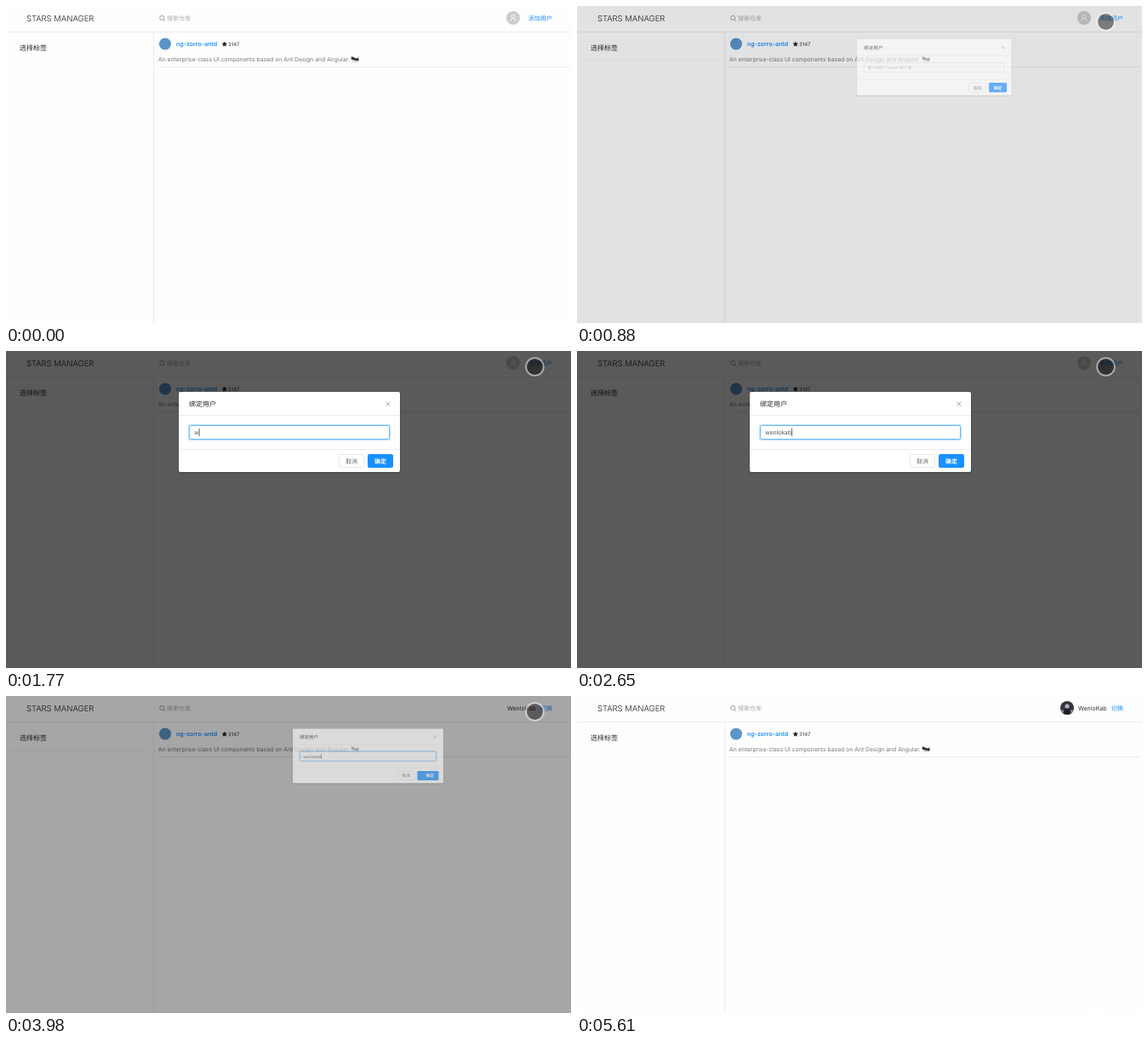
Write an HTML page that moves like this. It is 664x372 px and loops after 5910 ms.

```html
<!DOCTYPE html>
<html lang="zh">
<head>
<meta charset="utf-8">
<title>Stars Manager</title>
<style>
  html, body { margin: 0; height: 100%; overflow: hidden; background: #fefefe; }
  svg { display: block; width: 100vw; height: 100vh; }
  text { font: 7px Inter, "Noto Sans CJK SC", "Noto Sans CJK", sans-serif; text-rendering: geometricPrecision; white-space: pre; }
  .blue { fill: #1890ff; }
  .big { font-size: 8px; fill: #262626; }
  .line { fill: none; stroke: #ececec; }
  .button { fill: #fff; stroke: #d9d9d9; stroke-width: .6; }
</style>
</head>
<body>
<svg viewBox="0 0 664 372">
  <rect width="664" height="372" fill="#fefefe"/>
  <path class="line" d="M0 30.5H664M173.5 31V372M179 71.5H662"/>

  <text x="24" y="18" style="font-size:9.5px;font-weight:300" fill="#222">STARS MANAGER</text>
  <g fill="none" stroke="#777" stroke-width=".7"><circle cx="183.2" cy="13.9" r="2.5"/><path d="M185 15.8l2 2"/></g>
  <text x="189" y="17" fill="#aaa">搜索仓库</text>
  <text class="big" x="16" y="52">选择标签</text>

  <circle cx="187" cy="44.5" r="7" fill="#5b95c9"/>
  <text class="blue" x="200" y="47" font-weight="600" style="font-weight:600">ng-zorro-antd</text>
  <path transform="translate(256.8 44.6)" fill="#222" d="M0-3.2L1-1.1 3.2-.9 1.6.7 2 3 0 1.9-2 3-1.6.7-3.2-.9-1-1.1z"/>
  <text x="261" y="46.8" style="font-size:6px" fill="#333">3147</text>
  <text x="179" y="65" style="font-size:6.8px" fill="#777">An enterprise-class UI components based on Ant Design and Angular.</text>
  <g fill="#2b2523" stroke="#2b2523" stroke-width=".5">
    <ellipse cx="407.6" cy="61.4" rx="1.8" ry="1.5"/><ellipse cx="410.3" cy="62.3" rx="1.5" ry="1.1"/><ellipse cx="413" cy="62.8" rx="1.5" ry="1.4"/>
    <path fill="none" d="M409.5 63l-2 2.6M410.3 63v2.8M411 63l2 2.6M413.5 61.5l1-2M407 60l-1.5-1.3"/>
  </g>

  <g id="guest">
    <circle cx="596" cy="14" r="8" fill="#ccc"/>
    <g fill="none" stroke="#fff" stroke-width=".8"><circle cx="596" cy="12.4" r="2"/><path d="M592.8 18a3.2 3.4 0 0 1 6.4 0"/></g>
    <text class="blue" x="614" y="16.8">添加用户</text>
  </g>
  <g id="member">
    <g id="photo">
      <circle cx="576" cy="14" r="8" fill="#35343c"/>
      <path d="M568.4 16.5h15.2a8 8 0 0 1-15.2 0z" fill="#85808c"/>
      <path d="M571.5 20.5q.5-6 4.5-6t4.5 6q-4.5 2.5-9 0z" fill="#1f1f27"/>
      <circle cx="576" cy="12" r="2.6" fill="#b5abc8"/>
    </g>
    <text x="589" y="16.8" fill="#333">WenloKab</text>
    <text class="blue" x="628" y="16.8">切换</text>
  </g>

  <g id="mask">
    <path d="M6 64H167" stroke="#000" stroke-opacity=".06"/>
    <rect id="shade" width="664" height="372"/>
  </g>

  <g id="modal">
    <rect x="202" y="49" width="262" height="95" rx="3" opacity=".12"/>
    <rect x="203" y="48" width="260" height="94" rx="2" fill="#fff"/>
    <path class="line" d="M203 75.5H463M203 115.5H463"/>
    <text class="big" x="215" y="65">绑定用户</text>
    <path d="M446.5 59.5l5 5m0-5l-5 5" stroke="#888" stroke-width=".7"/>
    <rect id="glow" x="214.5" y="86.5" width="237" height="18" rx="2.5" fill="none" stroke="#1890ff" stroke-opacity=".25" stroke-width="1.5"/>
    <rect id="field" x="215.5" y="87.5" width="235" height="16" rx="2" fill="#fff" stroke-width=".8"/>
    <text id="hint" x="221" y="98.4" fill="#b5b5b5">输入你的 Tavlen 用户名</text>
    <text id="typed" x="221" y="98.4" style="font-size:6.8px" fill="#555"></text>
    <rect id="caret" y="91" width=".7" height="9" fill="#222"/>
    <g id="cancel">
      <rect class="button" x="391.5" y="121.5" width="29" height="15" rx="2"/>
      <text x="399" y="131.8" fill="#666">取消</text>
    </g>
    <rect id="ok" class="blue" y="121" height="16" rx="2"/>
    <path id="spinner" d="M429 126.5a2.5 2.5 0 0 1 2.5 2.5" fill="none" stroke="#fff" stroke-width=".7"/>
    <text x="433" y="131.8" fill="#fff" style="font-weight:700">确定</text>
  </g>

  <g id="pointer">
    <circle r="10.3" fill="none" stroke="#fff" stroke-opacity=".5" stroke-width="2"/>
    <circle id="disc" r="9.5" fill-opacity=".45"/>
  </g>
</svg>
<script>
const LOOP = 5910, TICK = 147.6, NAME = 'wenlokab';
const $ = id => document.getElementById(id);
const set = (id, attrs) => { for (const k in attrs) $(id).setAttribute(k, attrs[k]); };
const show = (id, on) => $(id).style.display = on ? '' : 'none';
const within = (n, from, to) => n >= from && n < to;

// [zoom progress, shade opacity] of the dialog at a given tick
function dialogState(n) {
  if (n === 6) return [.625, .11];
  if (n === 7) return [.98, .595];
  if (within(n, 8, 27)) return [1, .645];
  return n === 27 ? [.6, .35] : [0, 0];
}

function drawDialog(n) {
  const [zoom, dark] = dialogState(n);
  show('mask', dark);
  show('modal', zoom);
  if (!zoom) return;
  set('shade', { opacity: dark });
  set('modal', { opacity: zoom, transform: `translate(622 18) scale(${.2 + .8 * zoom}) translate(-622 -18)` });

  const focused = n > 6;
  show('glow', focused);
  set('field', { stroke: focused ? '#40a9ff' : '#d9d9d9' });

  const count = Math.max(0, Math.min(NAME.length, Math.floor((n - 11) * 8 / 7)));
  $('typed').textContent = NAME.slice(0, count);
  show('hint', !count);
  show('caret', focused && !within(n, 10, 12) && !within(n, 22, 25));
  set('caret', { x: 221 + (count ? $('typed').getComputedTextLength() + .2 : 0) });

  const grow = n < 20 ? 0 : n === 20 ? 4 : 7;
  set('cancel', { transform: `translate(${-grow} 0)` });
  set('ok', { x: 425 - grow, width: 30 + grow });
  show('spinner', within(n, 20, 26));
  set('spinner', { transform: `rotate(${n * 53} 429 129)` });
}

function drawPointer(n) {
  const u = Math.max(0, Math.min(1, (n - 32) / 4)), p = u * u * (3 - 2 * u);
  const enter = Math.min(1, (n - 1) / 3);
  const x = (1 - p) ** 2 * 621.5 + 2 * p * (1 - p) * 636 + p * p * 613.5 - 5 * (1 - enter);
  show('pointer', n > 1);
  set('pointer', { transform: `translate(${x} ${18.5 + 340 * p})`, opacity: Math.max(0, enter) });
  set('disc', { fill: n < 38 ? '#000' : '#fff' });
}

function draw(now) {
  const n = Math.floor((now % LOOP + 11) / TICK);
  show('guest', n < 26);
  show('member', n >= 26);
  show('photo', n >= 29);
  drawDialog(n);
  drawPointer(n);
  requestAnimationFrame(draw);
}
draw(performance.now());
</script>
</body>
</html>
```
